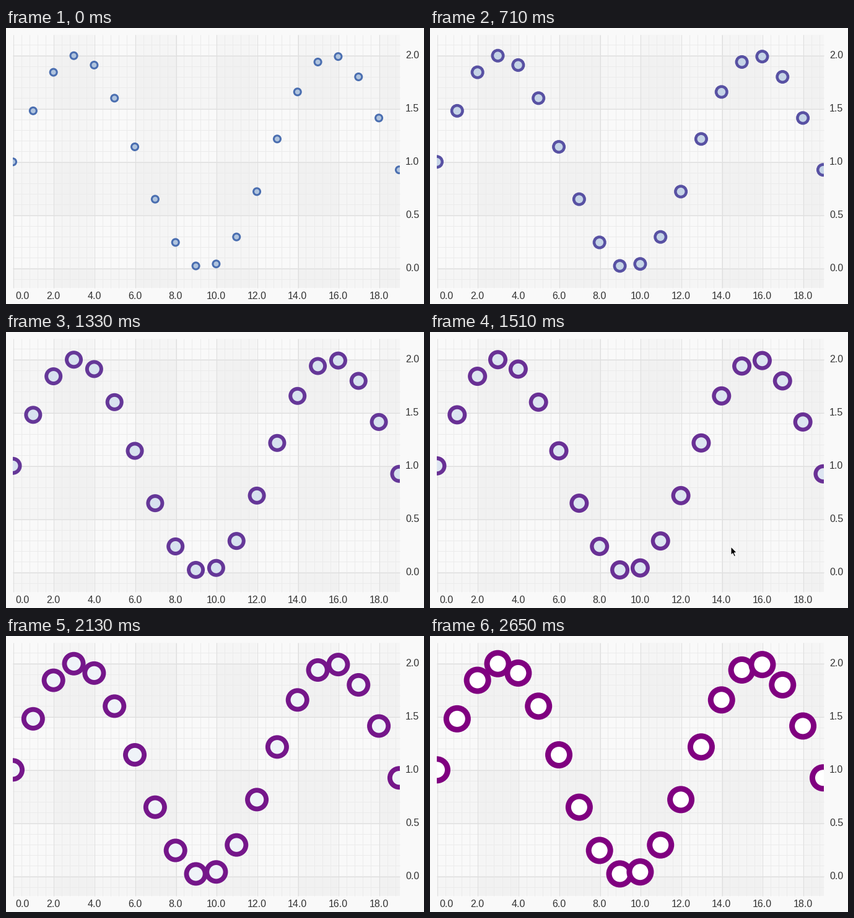
Animation of 675 by 446 pixels, one loop 3.09 s. Source, as a matplotlib script:

```python
import matplotlib.pyplot as plt
import numpy as np
from matplotlib.animation import FuncAnimation
from matplotlib.collections import LineCollection
from matplotlib.patches import Circle, Polygon, Rectangle

W, H, DPI = 675, 446, 100
PT = 72 / DPI                       # points per pixel
LOOP, TICK = 3090, 10               # ms
LEFT, RIGHT, TOP, BOTTOM = 11, 636, 11, 420
STEP_X, UNIT_Y, ZERO_Y = 32.84, 172, 388

# 30 growth steps of 90 ms, a few of them 10 ms shorter
STEPS = 30
SHORT = (6, 13, 20, 26, 30)
CHANGES = np.cumsum([80 if k in SHORT else 90 for k in range(1, STEPS + 1)])

# growth step -> tip of the mouse pointer
POINTER_PATH = {17: (486, 347), 18: (486, 397)}
ARROW = np.array([(0, 0), (0, 13.4), (3, 10.7), (5.2, 15.8), (7.4, 14.8),
                  (5.2, 9.9), (9.3, 9.5)])

STROKE = np.array([(74, 110, 176), (128, 0, 128)]) / 255
FILL = np.array([(176, 196, 222), (255, 255, 255)]) / 255


def mix(pair, u):
    return tuple(pair[0] + (pair[1] - pair[0]) * u)


def to_x(value):
    return LEFT + STEP_X * value


def to_y(value):
    return ZERO_Y - UNIT_Y * value


fig = plt.figure(figsize=(W / DPI, H / DPI), dpi=DPI, facecolor="#f9f9f9")
ax = fig.add_axes([0, 0, 1, 1])
ax.set_xlim(0, W)
ax.set_ylim(H, 0)
ax.axis("off")


def band(x0, y0, x1, y1):
    ax.add_patch(Rectangle((x0, y0), x1 - x0, y1 - y0, lw=0,
                           fc="#aaaaaa", alpha=0.045, zorder=1))


def grid(xs, ys, color, zorder):
    xs = np.floor(xs) + 0.5
    ys = np.floor(ys) + 0.5
    lines = [[(x, TOP), (x, BOTTOM)] for x in xs]
    lines += [[(LEFT, y), (RIGHT, y)] for y in ys]
    ax.add_collection(LineCollection(lines, colors=color, linewidths=PT,
                                     capstyle="butt", zorder=zorder))


def label(x, y, value, align):
    ax.text(x, y, f"{value:.1f}", ha=align, va="baseline", color="#333333",
            family="Liberation Sans", fontsize=16 * PT, zorder=3)


for v in range(2, 20, 4):
    band(round(to_x(v)), TOP, min(round(to_x(v + 2)), RIGHT), BOTTOM)
for v in (2, 1, 0):
    band(LEFT, to_y(v), RIGHT, min(to_y(v - 0.5), BOTTOM))

grid(to_x(np.arange(48) * 0.4), to_y(np.arange(-1, 22) * 0.1 + 1e-6),
     "#ebebeb", 1.5)
grid(to_x(np.arange(0, 20, 2)) + 0.3, to_y(np.arange(5) * 0.5),
     "#dedede", 1.6)

for v in range(0, 20, 2):
    label(max(to_x(v), 26), 438, v, "center")
for v in np.arange(5) * 0.5:
    label(645, to_y(v) + 5, v, "left")

clip = Rectangle((LEFT, TOP), RIGHT - LEFT, BOTTOM - TOP,
                 transform=ax.transData)
dots = []
for i in range(20):
    dot = Circle((to_x(i), to_y(1 + np.sin(i / 2)) + 0.3), 5, zorder=4 + i / 100)
    ax.add_patch(dot)
    dot.set_clip_path(clip)
    dots.append(dot)

pointer = Polygon(ARROW, closed=True, fc="black", ec="white", lw=PT, zorder=6)
ax.add_patch(pointer)


def draw(frame):
    step = int(np.searchsorted(CHANGES, frame * TICK, side="right"))
    u = step / STEPS
    width = 3 + 6 * u
    radius = 7 + 15 * u - width / 2
    for dot in dots:
        dot.set_radius(radius)
        dot.set_linewidth(width * PT)
        dot.set_edgecolor(mix(STROKE, u))
        dot.set_facecolor(mix(FILL, u))
    tip = POINTER_PATH.get(step)
    pointer.set_visible(tip is not None)
    if tip:
        pointer.set_xy(ARROW + tip)
    return dots + [pointer]


anim = FuncAnimation(fig, draw, frames=LOOP // TICK, interval=TICK,
                     repeat=True, repeat_delay=0, blit=False)
plt.show()
```
